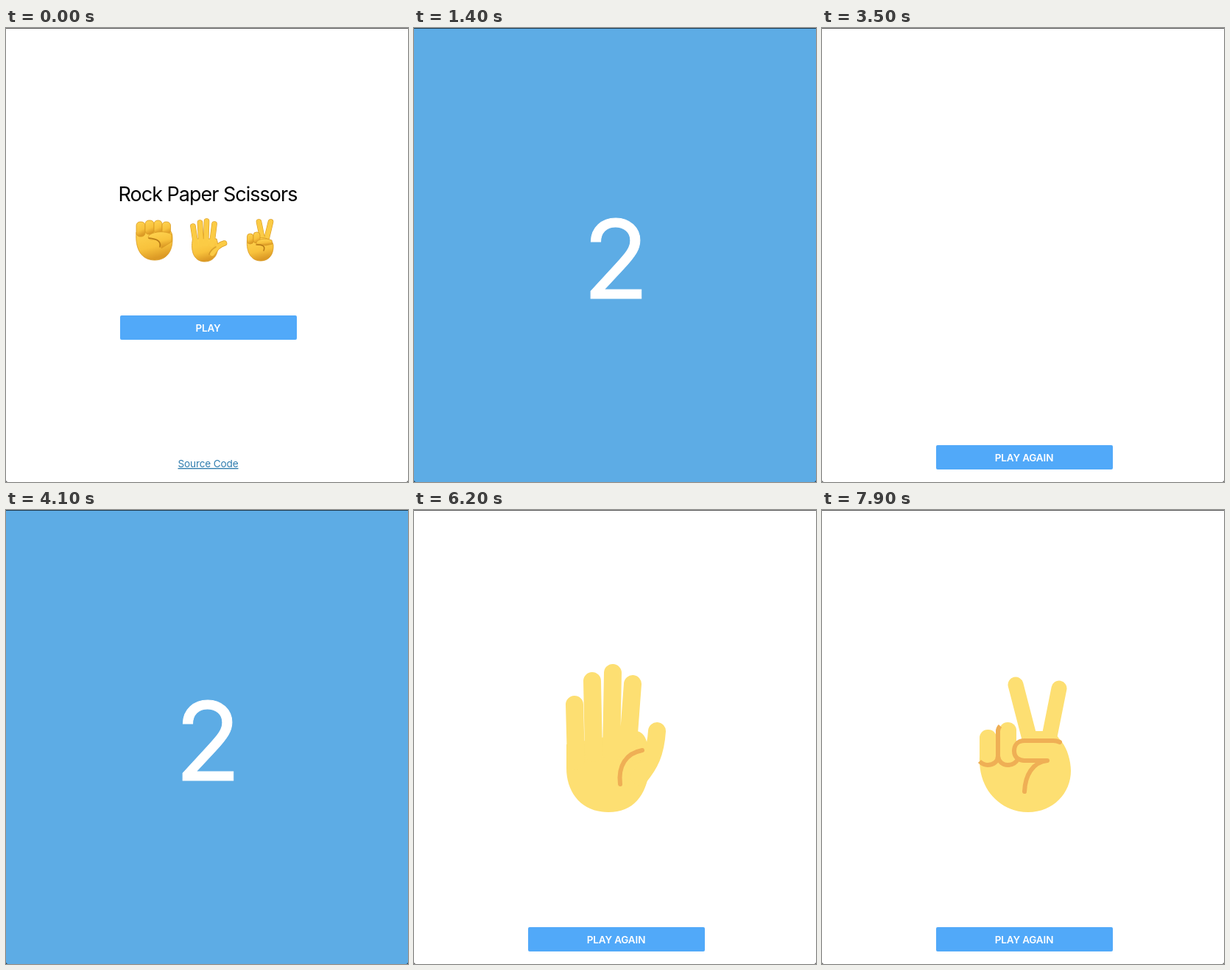
Write an HTML page that moves like this. It is 546 by 616 pixels and loops after 8000 ms.

```html
<!DOCTYPE html>
<html lang="en">
<head>
<meta charset="utf-8">
<title>Rock Paper Scissors</title>
<style>
  html, body { margin: 0; width: 100%; height: 100%; overflow: hidden; background: #fff; }
  svg { display: block; width: 100vw; height: 100vh; }
  text { font-family: Inter, "Open Sans", sans-serif; text-anchor: middle; }
  .title { font-size: 27px; letter-spacing: -1px; }
  .label { font-size: 13.5px; font-weight: 600; letter-spacing: -.15px; fill: #fff; }
  .link { font-size: 13.6px; letter-spacing: -.15px; fill: #2f7cae; text-decoration: underline; }
  .digit { font-size: 148px; fill: #fff; stroke: #fff; text-anchor: start; }
  .skin { fill: url(#gold); stroke: #d99a22; stroke-width: .8; }
  .edge, .finger, .crease, .limb, .line { fill: none; stroke-linecap: round; stroke-linejoin: round; }
  .edge { stroke: #d99a22; stroke-width: 7.6; }
  .finger { stroke: #fbcb45; stroke-width: 6.4; }
  .crease { stroke: #b87a16; stroke-width: 1.6; }
  .flat { fill: #fddf72; }
  .limb { stroke: #fddf72; stroke-width: 21; }
  .line { stroke: #efaf55; stroke-width: 6; }
</style>
</head>
<body>
<svg viewBox="0 0 546 616" preserveAspectRatio="none">
  <defs>
    <linearGradient id="gold" x1="0" y1="0" x2="0.3" y2="1">
      <stop offset="0" stop-color="#ffd552"/>
      <stop offset=".65" stop-color="#f8c23c"/>
      <stop offset="1" stop-color="#dc9a25"/>
    </linearGradient>
    <path id="openFingers" d="M254 269L258 295M263.500 264L265 293M272.500 262L271.500 293M283 266L279.500 294M296.500 292Q288 294 280 306"/>
    <path id="vFingers" d="M343.500 263L349 290M359.500 263L353 290"/>

    <g id="home">
      <rect width="546" height="616" fill="#fff"/>
      <text class="title" x="274" y="235">Rock Paper Scissors</text>
      <g>
        <path class="skin" d="M177 277C175 300 184 315 202 315C218 315 227 303 226 284C226 275 221 272 215 274Z"/>
        <rect class="skin" x="177" y="263" width="12" height="20" rx="5"/>
        <rect class="skin" x="189" y="261" width="12" height="19" rx="5"/>
        <rect class="skin" x="201" y="261" width="11" height="18" rx="5"/>
        <rect class="skin" x="212" y="263" width="11.500" height="17" rx="5"/>
        <path class="skin" d="M225 280C216 275 203 276 196 280C191 283 193 288 200 287C208 287 211 292 211 299L225 290Z" stroke="none"/>
        <path class="crease" d="M194 285C203 286 211 288 209 297"/>
      </g>
      <g>
        <use href="#openFingers" class="edge"/>
        <path class="skin" d="M253.500 286L286 286C291 300 286 317 270 317C256 317 250 304 253.500 286Z"/>
        <use href="#openFingers" class="finger"/>
        <path class="crease" d="M285 297Q278 301 276 307" opacity=".5"/>
      </g>
      <g>
        <use href="#vFingers" class="edge"/>
        <use href="#vFingers" class="finger"/>
        <path class="skin" d="M327.500 288C326 304 333 316 346 316C358 316 364 306 363 294C361 286 350 283 340 285Z"/>
        <rect class="skin" x="327.500" y="279" width="8.500" height="14" rx="4"/>
        <rect class="skin" x="336" y="277" width="9" height="15" rx="4"/>
        <path class="skin" d="M361 288C352 284 341 287 340 291C340 296 347 294 353 295L362 293Z" stroke="none"/>
        <path class="crease" d="M340 294C347 294 353 295 350 302"/>
      </g>
      <rect x="155" y="390" width="240" height="33" rx="2" fill="#51a9f9"/>
      <text class="label" x="274.500" y="412">PLAY</text>
      <text class="link" x="274.500" y="596">Source Code</text>
    </g>

    <g id="one"><rect width="546" height="616" fill="#50c6b1"/><text class="digit" data-left="248" y="367">1</text></g>
    <g id="two"><rect width="546" height="616" fill="#5dace5"/><text class="digit" data-left="240" y="367">2</text></g>
    <g id="three"><rect width="546" height="616" fill="#ad7ac4"/><text class="digit" data-left="237" y="367">3</text></g>

    <g id="result">
      <rect width="546" height="616" fill="#fff"/>
      <rect x="155" y="566" width="240" height="33" rx="2" fill="#51a9f9"/>
      <text class="label" x="274.500" y="588">PLAY AGAIN</text>
    </g>

    <g id="paper">
      <path class="flat" d="M207 318L301 300C311 300 318 310 318 330L320 352C315 388 298 410 264 410C227 410 207 383 207 350Z"/>
      <path class="limb" style="stroke-width:24" d="M218 264L220 340M242 232L244 330M270 221L268 330M297 236L290 330M330 300C328 330 320 345 306 362"/>
      <path class="line" d="M310 326C288 330 277 347 280 372"/>
    </g>

    <g id="scissors">
      <path class="limb" d="M263 237L284 318M322 242L308 312"/>
      <path class="flat" d="M214 335C212 380 243 410 280 410C314 410 338 384 338 354C338 340 333 324 326 315L314 300H286L255 325Z"/>
      <rect class="flat" x="214" y="298" width="23" height="49" rx="11"/>
      <rect class="flat" x="241" y="288" width="23" height="58" rx="11"/>
      <path class="line" style="stroke-linecap:butt" d="M214 341Q219 346 225 346C233 346 239 341 239 334V300Q239 296 242 293"/>
      <path class="line" d="M239 334C240 342 246 346 252 346C260 346 264 342 266 338M323 315Q319 313 314 313H275C265 313 261 320 261 327C261 336 268 340 275 340H306C286 342 276 360 275 382"/>
    </g>
  </defs>
  <g id="layers"></g>
  <rect width="546" height="1" opacity=".65"/>
  <path d="M0 614v2h2zM546 614v2h-2z" opacity=".6"/>
</svg>
<script>
  const LOOP = 8000;

  // Each layer covers the ones before it: [name, start, fade duration].
  const timeline = [
    ["home", 0],
    ["one", 800], ["two", 1400], ["three", 1800], ["result", 2300],
    ["one", 3600], ["two", 4100], ["three", 4600], ["result", 5100],
    ["paper", 5350, 450],
    ["one", 6300], ["two", 6800], ["three", 7300], ["result", 7800],
    ["scissors", 7800, 100]
  ];

  const layers = timeline.map(([name, start, fade = 0]) => {
    const node = document.createElementNS("http://www.w3.org/2000/svg", "use");
    node.setAttribute("href", "#" + name);
    document.getElementById("layers").append(node);
    return { node, start, fade };
  });

  // Align the visible left edge of each digit, without its side bearing.
  const pen = document.createElement("canvas").getContext("2d");
  pen.font = '148px Inter, "Open Sans", sans-serif';
  for (const digit of document.querySelectorAll(".digit")) {
    const bearing = pen.measureText(digit.textContent).actualBoundingBoxLeft;
    digit.setAttribute("x", +digit.dataset.left + bearing);
  }

  function render(t) {
    for (const { node, start, fade } of layers) {
      const opacity = t < start ? 0 : fade ? Math.min(1, (t - start) / fade) : 1;
      node.setAttribute("opacity", opacity);
      node.style.display = opacity ? "" : "none";
    }
  }

  const origin = performance.now();
  function tick() {
    render((performance.now() - origin) % LOOP);
    requestAnimationFrame(tick);
  }
  tick();
</script>
</body>
</html>
```
